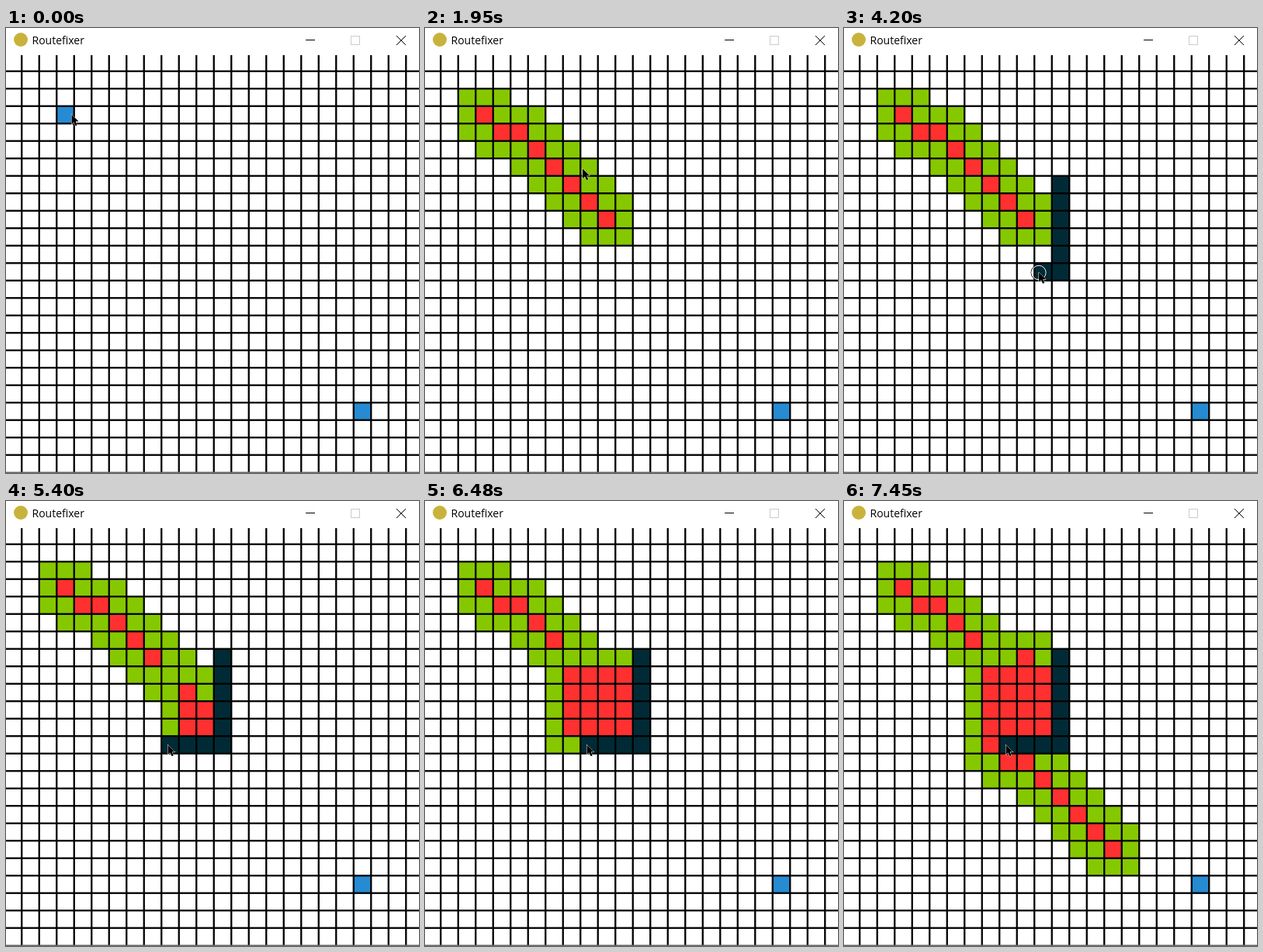
Write an HTML page with a canvas that moves like this. It is 532x574 px and loops after 8 s.

```html
<!DOCTYPE html>
<html lang="en">
<head>
<meta charset="utf-8">
<title>Routefixer</title>
<style>
html, body { margin: 0; width: 100%; height: 100%; overflow: hidden; background: #fff; }
canvas { display: block; }
</style>
</head>
<body>
<canvas id="stage" width="532" height="574"></canvas>
<script>
const ctx = document.getElementById('stage').getContext('2d');
const LOOP = 8000, CELL = 22.5, LEFT = -2, TOP = 33.5;
const BLUE = '#268bd2', GREEN = '#86c800', RED = '#ff3030', WALL = '#002b36';

// Search: cells closed at each time; closing a cell opens its neighbours
const closed = [
  [1300, '3,3'], [1450, '4,4'], [1570, '5,4 6,5'],
  [1710, '7,6'], [1830, '8,7'], [1950, '9,8 10,9'],
  [5150, '11,10'], [5280, '11,11 10,10'], [5400, '10,11'],
  [5540, '9,11'], [5660, '9,10'], [5790, '11,9 11,8'], [5910, '9,9'],
  [6050, '10,8'], [6200, '9,8 8,11'], [6320, '8,9'], [6480, '8,8 8,10'],
  [6620, '10,7'], [6740, '8,12'], [6890, '9,13 10,13'], [7050, '11,14'],
  [7200, '12,15'], [7330, '13,16 14,17'], [7450, '15,18']
];
const reopened = [[5000, '9,8'], [6200, '8,7']];
const walls = [
  [3210, '12,7'], [3360, '12,8'], [3630, '12,9 12,10'], [3780, '12,11'],
  [3900, '12,12'], [4200, '11,12'], [4320, '10,12'], [4440, '9,12']
];
// Pointer: time, x, y
const pointer = [
  [0, 84, 111], [740, 141, 146], [860, 202.5, 181], [2640, 209.5, 181],
  [2780, 250, 195], [2900, 286.5, 209.5], [3360, 288, 225], [3490, 288, 241],
  [3630, 286, 276], [3780, 286, 296], [3900, 285, 314.5], [4060, 279, 315],
  [4200, 250.5, 314.5], [4320, 229, 314.5], [4440, 208, 314]
];
const PRESS = 3210, RELEASE = 4720;

const expand = (list, act) =>
  list.flatMap(([t, cells]) => cells.split(' ').map(c => ({ t, act, at: c.split(',').map(Number) })));
const events = [...expand(walls, 'wall'), ...expand(closed, 'close'), ...expand(reopened, 'reopen')]
  .sort((a, b) => a.t - b.t);

function cellsAt(time) {
  const cells = { '3,3': BLUE, '20,20': BLUE };
  for (const { t, act, at: [x, y] } of events) {
    if (t > time) break;
    const key = x + ',' + y;
    if (act === 'wall') cells[key] = WALL;
    else if (act === 'reopen') cells[key] = GREEN;
    else {
      cells[key] = RED;
      for (let i = x - 1; i <= x + 1; i++)
        for (let j = y - 1; j <= y + 1; j++) cells[i + ',' + j] ??= GREEN;
    }
  }
  return cells;
}

function rect(color, x, y, w, h) {
  ctx.fillStyle = color;
  ctx.fillRect(x, y, w, h);
}

function circle(x, y, r) {
  ctx.beginPath();
  ctx.arc(x, y, r, 0, 2 * Math.PI);
}

function drawBoard(time) {
  for (const [key, color] of Object.entries(cellsAt(time))) {
    const [x, y] = key.split(',');
    rect(color, LEFT + x * CELL, TOP + y * CELL, CELL, CELL);
  }
  for (let i = 1; i < 24; i++) {
    rect('#000', LEFT + i * CELL - 1.4, 35, 2.3, 538);
    rect('#000', 0, TOP + i * CELL - 1.4, 532, 2.3);
  }
  rect('#666', 0, 572.5, 532, 1.5);
}

function drawTitleBar() {
  rect('#fff', 0, 0, 532, 35);
  ctx.fillStyle = '#c9b23c';
  circle(19, 15, 9);
  ctx.fill();
  ctx.fillStyle = '#000';
  ctx.font = '14px "Open Sans", "Noto Sans", sans-serif';
  ctx.fillText('Routefixer', 33.5, 21);
  rect('#000', 386, 15, 12, 1);
  ctx.lineWidth = 1;
  ctx.strokeStyle = '#ccc';
  ctx.strokeRect(444.5, 10.5, 11, 11);
  ctx.strokeStyle = '#000';
  ctx.stroke(new Path2D('M503 10l12 12M515 10l-12 12'));
}

const arrow = new Path2D('M.5 .5V13.2L3.4 10.6L5.6 15.2L7.8 14.2L5.7 9.6H9.6Z');

function drawPointer(time) {
  const [, x, y] = pointer.findLast(p => p[0] <= time);
  ctx.lineWidth = 1;
  if (time >= PRESS && time < RELEASE) {
    for (const [color, r] of [['#000', 10], ['#fff', 9.2]]) {
      ctx.strokeStyle = color;
      circle(x + .5, y + 1, r);
      ctx.stroke();
    }
  }
  ctx.save();
  ctx.translate(x, y);
  ctx.fillStyle = '#000';
  ctx.strokeStyle = '#fff';
  ctx.stroke(arrow);
  ctx.fill(arrow);
  ctx.restore();
}

const start = performance.now();
function draw() {
  const time = (performance.now() - start) % LOOP;
  rect('#fff', 0, 0, 532, 574);
  drawBoard(time);
  drawTitleBar();
  drawPointer(time);
  requestAnimationFrame(draw);
}
draw();
</script>
</body>
</html>
```
